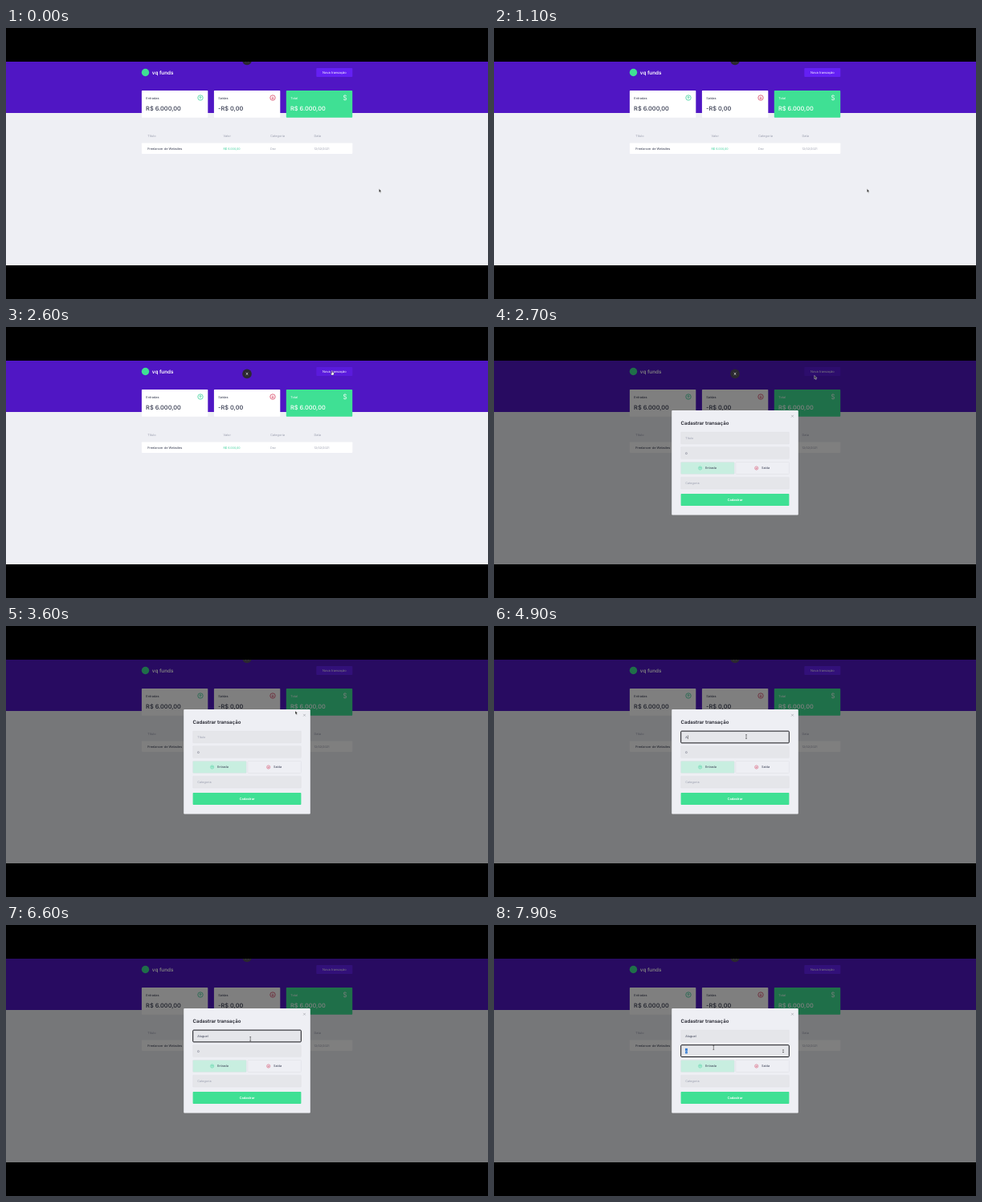
An HTML page that plays this animation: 600x338 px, repeating every 8 s.

```html
<!DOCTYPE html>
<html lang="pt-BR">
<head>
<meta charset="utf-8">
<title>Transações</title>
<style>
  html, body { margin: 0; width: 100%; height: 100%; overflow: hidden; background: #000; }
  svg { display: block; width: 100%; height: 100%; }
  text { font-family: Inter, "Open Sans", sans-serif; white-space: pre; }
</style>
</head>
<body>
<svg id="stage" viewBox="0 0 600 338" text-rendering="geometricPrecision"></svg>
<script>
const LOOP = 8000, STEP = 100;
const C = {
  purple: '#5016c4', button: '#6420f4', hover: '#5a1bdc', page: '#eeeff4',
  green: '#3fe094', income: '#36cf98', red: '#d43a5c', ink: '#363b50', gray: '#9a9eae',
  field: '#e5e6ea', line: '#dcdde2'
};

const rect = (x, y, w, h, fill, extra = '') =>
  `<rect x="${x}" y="${y}" width="${w}" height="${h}" fill="${fill}" ${extra}/>`;
const text = (x, y, size, fill, str, weight = 400, extra = '') =>
  `<text x="${x}" y="${y}" font-size="${size}" fill="${fill}" font-weight="${weight}" ${extra}>${str}</text>`;
const arrowIcon = (x, y, scale, color, turn) =>
  `<g transform="translate(${x} ${y}) rotate(${turn}) scale(${scale})" fill="none" stroke="${color}" stroke-width=".75">
    <circle r="3.2"/><path d="M0 1.5V-1.5M-1.4 -.1L0 -1.5L1.4 -.1"/></g>`;
const cross = (x, y, r, color, width) =>
  `<path d="M${x - r} ${y - r}l${2 * r} ${2 * r}m0 ${-2 * r}l${-2 * r} ${2 * r}" stroke="${color}" stroke-width="${width}"/>`;
const card = (x, label, value, fill, ink, icon) =>
  rect(x, 78, 82.4, 33.8, fill, 'rx=".8"') +
  text(x + 5.4, 88.8, 3.9, ink, label) +
  text(x + 5.2, 103, 7.4, ink, value, 500) + icon;
const field = y => rect(232.6, y, 134.8, 15, C.field, `rx=".8" stroke="${C.line}" stroke-width=".3"`);

const page =
  rect(0, 0, 600, 338, '#000') +
  rect(0, 42, 600, 254, C.page) +
  rect(0, 42, 600, 64, C.purple) +
  `<circle cx="173.5" cy="55.5" r="4.7" fill="${C.green}"/>` +
  text(181.8, 57.6, 6.3, '#fff', 'vq funds', 600) +
  rect(386.3, 50, 45, 11, C.button, 'rx="1" id="newBtn"') +
  text(408.8, 57, 4, '#fff', 'Nova transação', 400, 'text-anchor="middle"') +
  card(168.9, 'Entradas', 'R$ 6.000,00', '#fff', C.ink, arrowIcon(242, 87, 1, C.income, 0)) +
  card(258.9, 'Saídas', '-R$ 0,00', '#fff', C.ink, arrowIcon(332, 87, 1, C.red, 180)) +
  card(348.8, 'Total', 'R$ 6.000,00', C.green, '#fff',
    text(422, 90.2, 8.6, '#fff', '$', 300, 'text-anchor="middle"')) +
  [[176.2, 'Título'], [270.5, 'Valor'], [329, 'Categoria'], [383.5, 'Data']]
    .map(([x, s]) => text(x, 136.4, 3.9, C.gray, s)).join('') +
  rect(168.9, 143.5, 262.4, 13.4, '#fff', 'rx=".8"') +
  text(176.2, 151.7, 3.9, C.ink, 'Freelancer de Websites') +
  text(270.5, 151.6, 3.65, C.income, 'R$ 6.000,00') +
  text(329, 151.6, 3.75, C.gray, 'Dev') +
  text(383.5, 151.6, 3.65, C.gray, '12/02/2021');

const modal = `<g id="modal">` +
  rect(0, 42, 600, 254, '#000', 'opacity=".5"') +
  rect(221.2, 104, 157.6, 130.4, C.page, 'rx="1"') +
  cross(371.5, 111.2, 1.4, '#8b8d96', .5) +
  text(232.4, 121.6, 6.1, '#20212b', 'Cadastrar transação', 600) +
  field(131) + field(149.6) + field(187.2) +
  text(238.3, 140, 3.75, C.gray, 'Título', 400, 'id="title"') +
  rect(238, 153.9, 2.9, 6.4, '#2f78d2', 'id="selection"') +
  text(238.3, 158.6, 3.75, C.ink, '0', 400, 'id="amount"') +
  `<path id="spinner" d="M358.9 156.5l1.1 -1.5l1.1 1.5zM358.9 158l1.1 1.5l1.1 -1.5z" fill="#444"/>` +
  rect(232.6, 168.5, 66.6, 15, '#c8eee0', `rx=".8" stroke="${C.line}" stroke-width=".4"`) +
  rect(300.8, 168.5, 66.6, 15, C.page, `rx=".8" stroke="${C.line}" stroke-width=".5"`) +
  arrowIcon(256.6, 176, .65, C.income, 0) + text(262.9, 177.4, 3.85, C.ink, 'Entrada') +
  arrowIcon(326.7, 176, .65, C.red, 180) + text(333, 177.4, 3.85, C.ink, 'Saída') +
  text(238.3, 196.3, 3.75, C.gray, 'Categoria') +
  rect(232.6, 208, 134.8, 15, C.green, 'rx=".8"') +
  text(300, 216.9, 4, '#fff', 'Cadastrar', 600, 'text-anchor="middle"') +
  rect(232.7, 131.1, 134.6, 14.8, 'none', 'id="focus" rx="1" stroke="#15161a" stroke-width="1"') +
  rect(240, 136.3, .4, 4.8, '#111', 'id="caret"') + `</g>`;

const chrome =
  `<clipPath id="view"><rect y="42" width="600" height="254"/></clipPath>
  <g clip-path="url(#view)"><g id="exit"><circle cx="300" cy="58.4" r="5.8" fill="#2b2930"/>${cross(300, 58.4, 1.3, '#fff', .7)}</g></g>
  <g id="pointer">
    <path id="arrow" d="M0 0V4.4L1 3.5L1.7 5.1L2.5 4.8L1.8 3.2H3.1Z" fill="#222" stroke="#fff" stroke-width=".4"/>
    <path id="hand" d="M-.5 0Q0 -.5 .5 0V1.6L2.2 2V3.6L1.6 5H-.7L-1.8 3L-1.4 2.5L-.5 3Z" fill="#fff" stroke="#222" stroke-width=".35"/>
    <path id="beam" d="M-.9 -2.4H.9M0 -2.4V2.4M-.9 2.4H.9" fill="none" stroke="#222" stroke-width=".5"/>
  </g>`;

const stage = document.getElementById('stage');
stage.innerHTML = page + modal + chrome;
const el = id => document.getElementById(id);
const show = (id, on) => el(id).setAttribute('visibility', on ? 'inherit' : 'hidden');

// time, x, y of the pointer's hot spot
const path = [
  [0, 464.3, 200.6], [1500, 464.3, 200.6], [1700, 461, 183], [2000, 450.2, 134.8],
  [2300, 421, 77], [2500, 407, 55], [2600, 406, 55], [2700, 398.8, 60.4], [3000, 393, 74],
  [3300, 382, 90], [4200, 316, 137.6], [4900, 314, 138], [5900, 313, 138.2],
  [6600, 304.2, 142], [7100, 298, 143.5], [7700, 274, 153], [8000, 273, 153]
];
const exitSlide = [[2200, -18], [2400, 0], [2900, 0], [3200, -18]];

function sample(keys, t) {
  const last = keys[keys.length - 1];
  if (t <= keys[0][0]) return keys[0].slice(1);
  if (t >= last[0]) return last.slice(1);
  const i = keys.findIndex(k => k[0] > t);
  const a = keys[i - 1], b = keys[i], p = (t - a[0]) / (b[0] - a[0]);
  return a.slice(1).map((v, j) => v + (b[j + 1] - v) * p);
}

const WORD = 'Aluguel', TYPE_AT = 4800, KEY_MS = 190;
const OPEN_AT = 2700, FOCUS_AT = 4300, AMOUNT_AT = 7500;

function draw(t) {
  const [x, y] = sample(path, t);
  const open = t >= OPEN_AT, focused = t >= FOCUS_AT, amount = t >= AMOUNT_AT;
  const inField = open && x > 232 && x < 368 && ((y > 131 && y < 146) || (y > 149.5 && y < 165));
  const onButton = !open && x > 386 && x < 431.5 && y > 50 && y < 61;

  el('pointer').setAttribute('transform', `translate(${x} ${y})`);
  show('beam', inField);
  show('hand', onButton);
  show('arrow', !inField && !onButton);
  el('newBtn').setAttribute('fill', onButton || (open && t < 3000) ? C.hover : C.button);

  const [dy] = sample(exitSlide, t);
  el('exit').setAttribute('transform', `translate(0 ${dy})`);

  show('modal', open);
  const count = t < TYPE_AT ? 0 : Math.min(WORD.length, 1 + Math.floor((t - TYPE_AT) / KEY_MS));
  const title = el('title');
  title.textContent = count ? WORD.slice(0, count) : 'Título';
  title.setAttribute('fill', count ? C.ink : C.gray);

  const lastKey = count ? TYPE_AT + (count - 1) * KEY_MS : FOCUS_AT;
  const blinkOn = (t - lastKey) % 1000 < 500;
  const width = count ? title.getComputedTextLength() : 0;
  el('caret').setAttribute('x', 238.4 + width);
  show('caret', open && focused && !amount && blinkOn);

  el('focus').setAttribute('y', amount ? 149.7 : 131.1);
  show('focus', open && focused);
  show('selection', open && amount);
  show('spinner', open && (amount || (inField && y > 149)));
  el('amount').setAttribute('fill', amount ? '#fff' : C.ink);
}

const start = performance.now();
function tick() {
  const t = (performance.now() - start) % LOOP;
  draw(Math.floor(t / STEP) * STEP);
  requestAnimationFrame(tick);
}
draw(0);
requestAnimationFrame(tick);
</script>
</body>
</html>
```
